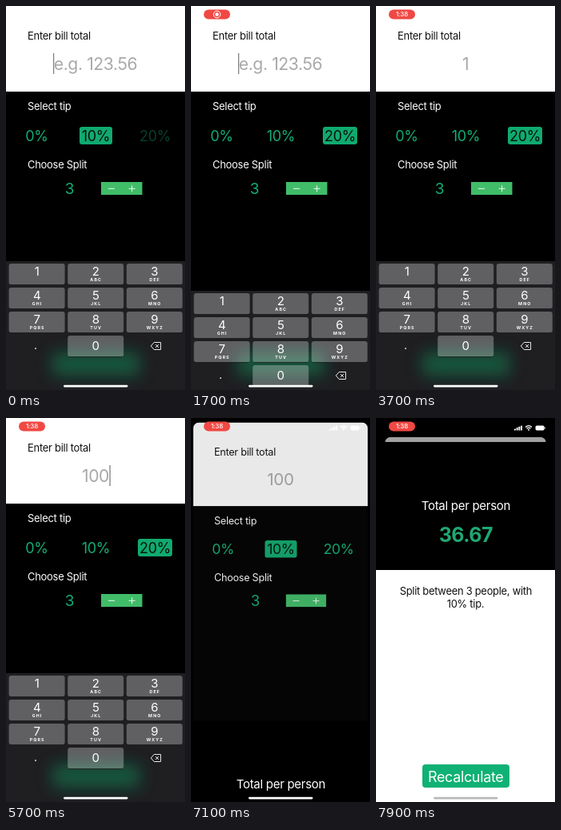
An HTML page for the animation above (8000 ms loop, 224 by 480 pixels).

```html
<!DOCTYPE html>
<html lang="en">
<head>
<meta charset="utf-8">
<title>Tip calculator</title>
<style>
  html, body { margin: 0; width: 100%; height: 100%; overflow: hidden; background: #000; }
  svg { display: block; width: 100%; height: 100%; }
  text { font-family: Inter, "Noto Sans", sans-serif; letter-spacing: -.02em; }
  .mid { text-anchor: middle; }
  .sub { font-weight: 700; letter-spacing: 1.1px; }
</style>
</head>
<body>
<svg id="stage" viewBox="0 0 224 480"></svg>
<script>
const LOOP = 8000, GREEN = '#12ae74', GREY = '#a9a9ac';
const KB_TOP = 319, KB_HEIGHT = 161, KB_TIME = 420;
const SHEET_TOP = 30, SHEET_TRAVEL = 454;

const rect = (x, y, w, h, fill, r = 0, more = '') =>
  `<rect x="${x}" y="${y}" width="${w}" height="${h}" rx="${r}" fill="${fill}" ${more}/>`;
const text = (x, y, size, fill, str, more = '') =>
  `<text x="${x}" y="${y}" font-size="${size}" fill="${fill}" ${more}>${str}</text>`;
const mid = (x, y, size, fill, str, more = '') =>
  text(x, y, size, fill, str, `class="mid" ${more}`);

const button = (id, label) => `<g id="${id}">
  ${rect(58, 433, 109, 29, '#0fb174', 4)}${mid(112.2, 454.5, 18, '#fff', label)}</g>`;

const tips = [['0%', 38.3, 33], ['10%', 112.5, 41], ['20%', 186.5, 43]];
const tip = ([label, x, w]) => `<g class="tip">
  ${rect(x - w / 2, 151, w, 22, '#10aa6f', 3)}${mid(x, 168.5, 18, GREEN, label)}</g>`;

const letters = ['', 'ABC', 'DEF', 'GHI', 'JKL', 'MNO', 'PQRS', 'TUV', 'WXYZ'];
function key(digit) {
  const i = digit ? digit - 1 : 10;
  const x = 3.6 + (i % 3) * 73.6, y = 322 + Math.floor(i / 3) * 30, cx = x + 35;
  const sub = digit ? letters[i] : '';
  return `<path d="M${x + 2} ${y + 26.6}h66" stroke="#0c0c0e" stroke-width=".8"/>` +
    rect(x, y, 70, 26.2, '#fff', 3, `id="key${digit}" fill-opacity=".29"`) +
    mid(cx, y + (digit ? 14.6 : 18.2), 15, '#fff', digit) +
    (sub && text(cx + .5, y + 22.4, 5.3, '#fff', sub, 'class="mid sub"'));
}

const keyboard = `<g id="keyboard" clip-path="url(#kbClip)">
  ${rect(0, KB_TOP, 224, KB_HEIGHT + 4, '#1f1e21')}
  ${rect(58, 433, 109, 29, '#0b8a58', 4, 'id="glow" filter="url(#blur)" opacity=".55"')}
  ${[1, 2, 3, 4, 5, 6, 7, 8, 9, 0].map(key).join('')}
  ${mid(37, 429, 14, '#fff', '.')}
  <path d="M181.3 425l4-4.5h8.3v9h-8.3zM187.1 423l4 4m0-4l-4 4" fill="none" stroke="#fff" stroke-width=".9" stroke-linejoin="round"/>
</g>`;

const form = `<g id="card"><g clip-path="url(#cardClip)">
  ${rect(0, 0, 224, 480, '#000')}${rect(0, 0, 224, 107, '#fff')}
  ${text(27, 42, 12.95, '#111', 'Enter bill total')}
  ${mid(112, 80, 21.2, GREY, '', 'id="amount"')}
  ${rect(0, 59, 1.3, 26, '#808084', 0, 'id="cursor"')}
  ${text(27, 130, 12.95, '#fff', 'Select tip')}
  ${tips.map(tip).join('')}
  ${text(27, 203, 12.95, '#fff', 'Choose Split')}
  ${mid(79.5, 235, 19, GREEN, '3')}
  ${rect(119, 220, 51.5, 16, '#41bd69')}
  <path d="M128 228.3h8m17.6 0h8m-4-4v8" stroke="#fff" stroke-width=".9"/>
  ${button('calculate', 'Calculate')}
  ${rect(0, 0, 224, 480, '#2f2f33', 0, 'id="dim"')}
</g></g>`;

const sheet = `<g id="sheet">
  ${rect(0, SHEET_TOP, 224, 200, '#000', 6)}${rect(0, 190, 224, 300, '#fff')}
  ${mid(112.4, 115, 15.05, '#fff', 'Total per person')}
  ${mid(112.4, 155, 25, '#1fa873', '36.67', 'font-weight="700"')}
  ${mid(112.4, 220.7, 12.9, '#111', 'Split between 3 people, with')}
  ${mid(112, 236.7, 12.9, '#111', '10% tip.')}
  ${button('recalculate', 'Recalculate')}
</g>`;

const status = `<g fill="#fff">
  ${[0, 1, 2, 3].map(i => rect(173 + i * 2.7, 13.4 - i * 1.3, 1.9, 2.2 + i * 1.3, '#fff', .5)).join('')}
  <path d="M187 11.4q4-3.6 8 0M188.6 13.2q2.4-2 4.8 0" fill="none" stroke="#fff" stroke-width="1.3"/>
  <circle cx="191" cy="14.8" r="1"/>
  ${rect(199.6, 9.6, 11, 5.8, '#fff', 1.6)}${rect(211.2, 11.4, .8, 2.2, '#fff', .4)}
</g>
<g id="pill">${rect(16, 4.5, 33, 12, '#f04843', 6)}
  <g id="rec"><circle cx="32.5" cy="10.5" r="4.3" fill="none" stroke="#fff"/><circle cx="32.5" cy="10.5" r="2.2" fill="#fff"/></g>
  ${mid(32.5, 13.3, 8, '#fff', '1:38', 'id="clock" font-weight="500"')}
</g>`;

const stage = document.getElementById('stage');
stage.innerHTML = `<defs>
  <clipPath id="kbClip"><rect y="${KB_TOP}" width="224" height="${KB_HEIGHT + 4}"/></clipPath>
  <clipPath id="cardClip"><rect id="cardShape" width="224" height="490"/></clipPath>
  <filter id="blur" x="-50%" y="-150%" width="200%" height="400%"><feGaussianBlur stdDeviation="10"/></filter>
  </defs>` + rect(0, 0, 224, 480, '#000') + form + keyboard + sheet + status +
  rect(72, 473.8, 80.5, 2.6, '#fff', 1.3, 'id="home"');

const $ = id => document.getElementById(id);
const tipNodes = [...document.querySelectorAll('.tip')];
const clamp = v => Math.min(1, Math.max(0, v));
const easeOut = (t, start, length) => 1 - (1 - clamp((t - start) / length)) ** 2;
const show = (id, on) => $(id).setAttribute('opacity', on ? 1 : 0);
const move = (id, y) => $(id).setAttribute('transform', `translate(0 ${y})`);

const focus = { from: 1481, to: 5800 };
const presses = [[3100, 1], [4500, 0], [5300, 0]];

function drawField(t) {
  const typed = presses.filter(p => p[0] <= t);
  const amount = $('amount');
  amount.textContent = typed.map(p => p[1]).join('') || 'e.g. 123.56';
  const half = amount.getComputedTextLength() / 2;
  const last = typed.length ? typed.at(-1)[0] : focus.from;
  const focused = t < 50 || (t >= focus.from && t < focus.to);
  $('cursor').setAttribute('x', typed.length ? 112 + half + .4 : 112 - half - .8);
  show('cursor', focused && (t < 50 || (t - last) % 1000 < 550));
  for (const digit of [0, 1]) {
    const down = presses.some(p => p[1] === digit && t >= p[0] && t < p[0] + 150);
    $('key' + digit).setAttribute('fill-opacity', down ? .13 : .29);
  }
}

function drawTips(t) {
  const chosen = t >= 100 && t < focus.to ? 2 : 1;
  tipNodes.forEach((node, i) => {
    const [box, label] = node.children;
    box.setAttribute('opacity', i === chosen ? 1 : 0);
    label.setAttribute('fill', i === chosen ? '#06140d' : GREEN);
    node.setAttribute('opacity', i === 2 && t < 100 ? .36 : 1);
  });
}

function drawKeyboard(t) {
  const down = easeOut(t, 50, KB_TIME) - easeOut(t, focus.from, KB_TIME) + easeOut(t, focus.to, KB_TIME);
  const y = down * (KB_HEIGHT + .5);
  move('keyboard', y);
  move('glow', -y);
}

function drawSheet(t) {
  const p = easeOut(t, 7038, 500), scale = 1 - .1 * p;
  $('card').setAttribute('transform', `translate(${112 * (1 - scale)} ${24 * p}) scale(${scale})`);
  $('cardShape').setAttribute('rx', p ? 8 : 0);
  $('dim').setAttribute('opacity', .45 * p);
  $('calculate').setAttribute('opacity', t >= 6850 && t < 7050 ? .35 : 1);
  move('sheet', p ? SHEET_TRAVEL * (1 - p) : 480);
  $('home').setAttribute('fill', p > .4 ? '#b9b9b9' : '#fff');
}

function draw(t) {
  drawField(t);
  drawTips(t);
  drawKeyboard(t);
  drawSheet(t);
  $('pill').setAttribute('opacity', clamp(t / 400));
  show('rec', t < 2700);
  show('clock', t >= 2700);
}

const step = t => Math.max(0, Math.floor((t + 100) / 200) * 200 - 100);

const start = performance.now();
function tick() {
  draw(step((performance.now() - start) % LOOP));
  requestAnimationFrame(tick);
}
tick();
</script>
</body>
</html>
```
